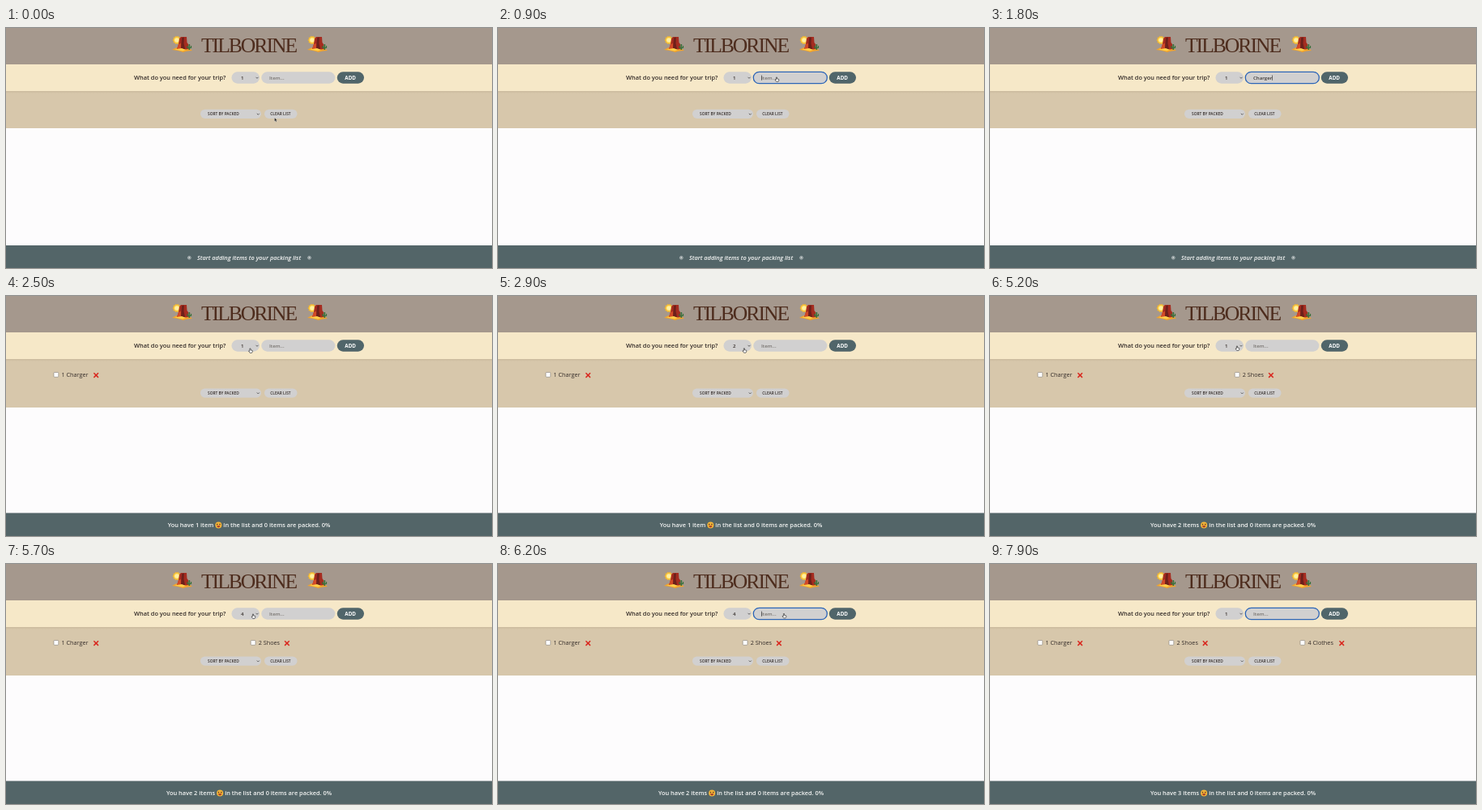
Write an HTML page with a canvas that moves like this. It is 600x297 px and loops after 8000 ms.

```html
<!DOCTYPE html>
<html lang="en">
<head>
<meta charset="utf-8">
<title>Packing list</title>
<style>
html, body { margin: 0; width: 100%; height: 100%; overflow: hidden; background: #fdfcfd; }
canvas { display: block; width: 600px; height: 297px; }
</style>
</head>
<body>
<canvas id="stage"></canvas>
<script>
const LOOP = 8000, W = 600, H = 297;
const SANS = '"Open Sans", "Noto Sans", sans-serif';
const INK = '#342c29';
const canvas = document.getElementById('stage');
const ctx = canvas.getContext('2d');
const ratio = window.devicePixelRatio || 1;
canvas.width = W * ratio;
canvas.height = H * ratio;

// One entry per packed item: typing start, time of adding, offset of the delete mark.
const items = [
  { qty: 1, name: 'Charger', type: 1050, add: 1950, mark: 52.2 },
  { qty: 2, name: 'Shoes', type: 3550, add: 4350, mark: 44.7 },
  { qty: 4, name: 'Clothes', type: 6450, add: 7550, mark: 51.2 }
];
const columns = [[], [59], [59, 302.2], [59, 221, 383]];
const focusSpans = [[850, 2350], [3250, 5050], [6050, LOOP]];
const picks = [[2800, 4350, 2], [5650, 7550, 4]];
const moves = [
  [[0, 331.5, 111], [250, 331.5, 111], [750, 344, 61], [1050, 344, 61]],
  [[2150, 344, 63], [2450, 301.5, 65], [2850, 301.5, 65], [3200, 346, 62], [3550, 346, 62]],
  [[4650, 346, 62], [5100, 305, 62], [5700, 305, 62], [6050, 353, 61.5], [6450, 353, 61.5]]
];

const inside = (t, [a, b]) => t >= a && t < b;
const ease = k => k * k * (3 - 2 * k);

function rect(x, y, w, h, fill) {
  ctx.fillStyle = fill;
  ctx.fillRect(x, y, w, h);
}

function pill(x, y, w, h, fill, r = h / 2) {
  ctx.beginPath();
  ctx.roundRect(x, y, w, h, r);
  ctx.fillStyle = fill;
  ctx.fill();
}

function dot(x, y, r, fill) {
  ctx.beginPath();
  ctx.arc(x, y, r, 0, 7);
  ctx.fillStyle = fill;
  ctx.fill();
}

function poly(points, fill) {
  ctx.beginPath();
  points.forEach(([x, y]) => ctx.lineTo(x, y));
  ctx.closePath();
  ctx.fillStyle = fill;
  ctx.fill();
}

function line(points, color, width) {
  ctx.beginPath();
  points.forEach(([x, y], i) => i ? ctx.lineTo(x, y) : ctx.moveTo(x, y));
  ctx.strokeStyle = color;
  ctx.lineWidth = width;
  ctx.stroke();
}

function text(str, x, y, size, color, weight = 600) {
  ctx.font = `${weight} ${size}px ${SANS}`;
  ctx.fillStyle = color;
  ctx.fillText(str, x, y);
  return ctx.measureText(str).width;
}

function chevron(x, y) {
  line([[x - 1.5, y - 0.7], [x, y + 0.8], [x + 1.5, y - 0.7]], '#444', 0.8);
}

function desert(x, y) {
  ctx.save();
  ctx.translate(x, y);
  for (let i = 0; i < 10; i++) {
    const a = i * Math.PI / 5;
    dot(6 + 4.3 * Math.cos(a), 5 + 4.3 * Math.sin(a), 1, '#f6b42b');
  }
  dot(6, 5, 4.2, '#ffc83a');
  dot(6, 5, 2.8, '#fff0a0');
  ctx.beginPath();
  ctx.moveTo(0, 17);
  ctx.quadraticCurveTo(7, 12, 13, 14.5);
  ctx.quadraticCurveTo(21, 14, 25, 18);
  ctx.quadraticCurveTo(17, 18.5, 14, 20);
  ctx.quadraticCurveTo(7, 17.5, 0, 17);
  ctx.fillStyle = '#f2a32c';
  ctx.fill();
  poly([[6, 16], [8, 10], [9, 3], [11, 1], [18, 1], [18.5, 8], [20, 10], [20.5, 16], [13, 17]], '#a52c20');
  poly([[12, 2], [15, 1.5], [14.5, 9], [16, 16], [11, 16]], '#6d211b');
  poly([[8, 10], [11, 9], [11, 16], [6, 16]], '#d14a27');
  poly([[3, 16.5], [12, 15], [17, 17], [13, 18.5]], '#ffd04b');
  line([[21.3, 10], [21.3, 17]], '#38713b', 1.7);
  line([[19, 12], [19, 14.5], [23.5, 14.5], [23.5, 12]], '#38713b', 1.2);
  ctx.restore();
}

function header() {
  rect(0, 0, W, 45, '#a5988d');
  desert(205, 10);
  desert(372, 10);
  ctx.font = '25.6px "Liberation Serif", "Noto Serif", serif';
  ctx.fillStyle = '#4d2c1d';
  ctx.letterSpacing = '-2px';
  ctx.textAlign = 'center';
  ctx.fillText('TILBORINE', 299.5, 30);
  ctx.letterSpacing = '0px';
  ctx.textAlign = 'left';
}

function form(t) {
  rect(0, 45, W, 33, '#f6e8c8');
  text('What do you need for your trip?', 158, 64.4, 7.4, INK);
  pill(278.5, 54.3, 34.5, 14.4, '#d1d0d0');
  const pick = picks.find(p => inside(t, p));
  text(pick ? pick[2] : 1, 290, 63.7, 6.1, INK);
  chevron(310, 61.5);

  const focus = focusSpans.find(s => inside(t, s));
  pill(315.3, 54.3, 91, 14.4, '#d1d0d0');
  if (focus) {
    ctx.strokeStyle = '#2c65b8';
    ctx.lineWidth = 1.3;
    ctx.stroke();
  }
  const item = items.find(i => inside(t, [i.type, i.add]));
  const typed = item ? item.name.slice(0, 1 + Math.floor((t - item.type) / 100)) : '';
  const width = typed ? text(typed, 325, 63.7, 6.1, '#3c3836') : 0;
  if (!typed) text('Item...', 325, 63.7, 6.1, '#77736f');
  if (focus) {
    const last = items.filter(i => t >= i.add && i.add > focus[0]).pop();
    const since = t - (last ? last.add : focus[0]);
    if (typed || since % 1000 < 300) rect(325 + width, 58.5, 0.6, 6.3, '#222');
  }
  pill(408.8, 54.3, 33.2, 14.4, '#50656a');
  text('ADD', 418.3, 63.8, 6.3, '#fff', 700);
}

function list(t, packed) {
  rect(0, 78, W, packed.length ? 60 : 46, '#d7c7ab');
  const fade = ctx.createLinearGradient(0, 78, 0, 81);
  fade.addColorStop(0, 'rgba(90,70,40,.10)');
  fade.addColorStop(1, 'rgba(90,70,40,0)');
  rect(0, 78, W, 3, fade);

  packed.forEach((item, i) => {
    const x = columns[packed.length][i];
    pill(x, 94.5, 5.8, 5.8, '#fff', 0.9);
    ctx.strokeStyle = '#827c76';
    ctx.lineWidth = 0.6;
    ctx.stroke();
    text(`${item.qty} ${item.name}`, x + 9.5, 100.2, 7.25, INK, 500);
    const cx = x + item.mark, cy = 98.1;
    line([[cx - 2.8, cy - 2.8], [cx + 2.8, cy + 2.8]], '#d9271e', 1.5);
    line([[cx + 2.8, cy - 2.8], [cx - 2.8, cy + 2.8]], '#d9271e', 1.5);
  });

  const y = packed.length ? 114.4 : 100.7;
  pill(240, y, 75, 11.3, '#d1d0d0');
  text('SORT BY PACKED', 249, y + 7.4, 4.8, INK);
  chevron(311.3, y + 5.8);
  pill(319, y, 40.5, 11.3, '#d1d0d0');
  text('CLEAR LIST', 326.3, y + 7.4, 4.8, INK);
}

function face(x, y) {
  dot(x, y, 4, '#f5b638');
  dot(x - 1.6, y - 1, 0.8, '#583322');
  dot(x + 1.6, y - 1, 0.8, '#583322');
  ctx.beginPath();
  ctx.arc(x, y + 0.7, 2.1, 0, Math.PI);
  ctx.fillStyle = '#a5382b';
  ctx.fill();
}

function badge(x, y) {
  ctx.beginPath();
  ctx.arc(x, y, 1.9, 0, 7);
  ctx.strokeStyle = '#e5e8e7';
  ctx.lineWidth = 0.6;
  ctx.stroke();
  dot(x, y, 1, '#e5e8e7');
}

function footer(count) {
  rect(0, count ? 268.5 : 269, W, 29, '#536568');
  if (!count) {
    badge(226.3, 284.3);
    badge(374.5, 284.3);
    ctx.textAlign = 'center';
    text('Start adding items to your packing list', 300, 286.7, 7.4, '#f5f6f5', 'italic 600');
    ctx.textAlign = 'left';
    return;
  }
  const head = `You have ${count} item${count > 1 ? 's' : ''}`;
  const tail = 'in the list and 0 items are packed. 0%';
  ctx.font = `600 7.4px ${SANS}`;
  const a = ctx.measureText(head).width, b = ctx.measureText(tail).width;
  const x = 300 - (a + b + 12) / 2;
  text(head, x, 286.2, 7.4, '#f5f6f5');
  face(x + a + 6, 283.6);
  text(tail, x + a + 12, 286.2, 7.4, '#f5f6f5');
}

function arrow(x, y) {
  poly([[x, y], [x, y + 4.6], [x + 1, y + 3.7], [x + 1.8, y + 5.3],
    [x + 2.6, y + 4.9], [x + 1.9, y + 3.4], [x + 3.2, y + 3.3]], '#161616');
  ctx.strokeStyle = '#eee';
  ctx.lineWidth = 0.35;
  ctx.stroke();
}

function hand(x, y) {
  poly([[x - 0.6, y], [x + 0.5, y], [x + 0.6, y + 2], [x + 2.7, y + 2.4],
    [x + 2.8, y + 4], [x + 2, y + 5.4], [x - 0.4, y + 5.4], [x - 2, y + 3], [x - 0.6, y + 3]], '#fff');
  ctx.strokeStyle = '#292929';
  ctx.lineWidth = 0.65;
  ctx.stroke();
}

function cursor(t) {
  const path = moves.find(m => inside(t, [m[0][0], m[m.length - 1][0]]));
  if (!path) return;
  const i = path.findIndex(p => p[0] > t);
  const [t0, x0, y0] = path[i - 1], [t1, x1, y1] = path[i];
  const k = ease((t - t0) / (t1 - t0));
  const x = x0 + (x1 - x0) * k, y = y0 + (y1 - y0) * k;
  const field = y > 53 && y < 69 && x > 278 && x < 407;
  (field ? hand : arrow)(x, y);
}

function draw(now) {
  const t = Math.floor(now % LOOP / 100) * 100;
  const packed = items.filter(i => t >= i.add);
  ctx.setTransform(ratio, 0, 0, ratio, 0, 0);
  rect(0, 0, W, H, '#fdfcfd');
  header();
  list(t, packed);
  form(t);
  footer(packed.length);
  cursor(t);
}

let start;
function tick(now) {
  start ??= now;
  draw(now - start);
  requestAnimationFrame(tick);
}
requestAnimationFrame(tick);
</script>
</body>
</html>
```
